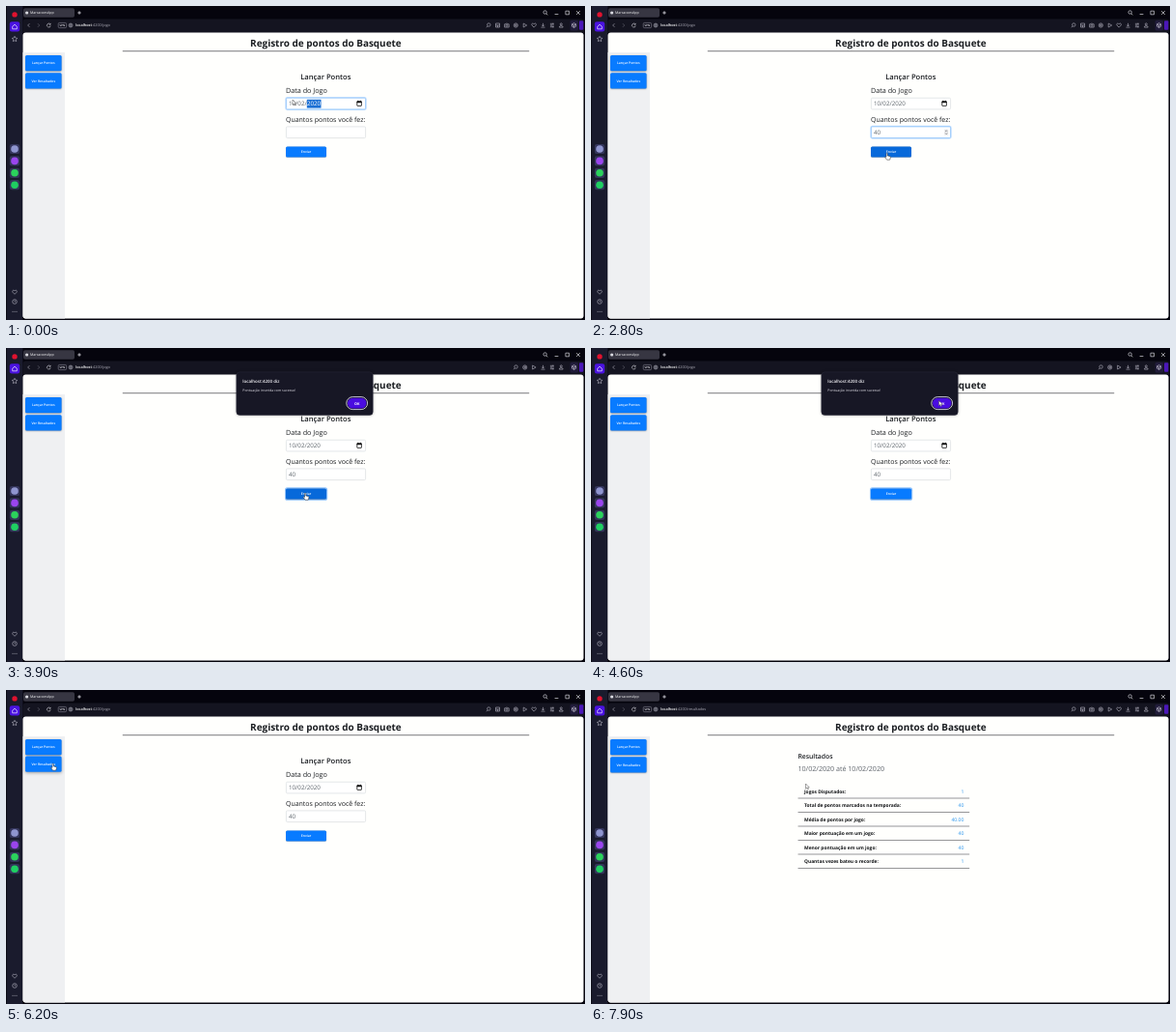
An HTML page with a canvas that plays this animation: 600 px wide and 325 px high, repeating every 8000 ms.

```html
<!DOCTYPE html>
<html lang="pt-BR">
<head>
<meta charset="utf-8">
<title>Registro de pontos</title>
<style>
html, body { margin: 0; width: 100%; height: 100%; overflow: hidden; background: #05040d; }
canvas { display: block; width: 600px; height: 325px; }
</style>
</head>
<body>
<canvas id="stage"></canvas>
<script>
const W = 600, H = 325, LOOP = 8000, STEP = 100;
const FONT = '"Open Sans", "Noto Sans", sans-serif';
const BLUE = '#087bff', HOVER = '#0769da', INK = '#1a1d21', VALUE = '#5d646b';
const canvas = document.getElementById('stage');
const c = canvas.getContext('2d');
const dpr = window.devicePixelRatio || 1;
canvas.width = W * dpr;
canvas.height = H * dpr;

// Moments of the interaction, in ms
const FOCUS = 1100, KEYS = [1900, 2100], SUBMIT = 2900, OPEN = 3000, CLOSE = 4700, NAV = 6500;

// Pointer rests: [leave at, arrive at, x, y]
const MOVES = [
  [0, 0, 297, 97],
  [300, 1000, 313, 129],
  [2200, 2700, 306, 152],
  [2900, 3600, 309.5, 150],
  [3900, 4500, 360.5, 54.5],
  [4900, 5900, 48, 76],
  [6600, 7400, 222.5, 97]
];

const ease = p => p * p * (3 - 2 * p);

function pointerAt(t) {
  let [, , x, y] = MOVES[0];
  for (const [from, to, nx, ny] of MOVES.slice(1)) {
    if (t <= from) break;
    const p = ease(Math.min(1, (t - from) / (to - from)));
    x += (nx - x) * p;
    y += (ny - y) * p;
  }
  return [x, y];
}

function text(s, x, y, size, color, weight = 400, align = 'left') {
  c.font = `${weight} ${size}px ${FONT}`;
  c.textAlign = align;
  c.fillStyle = color;
  c.fillText(s, x, y);
  return c.measureText(s).width;
}

function rect(x, y, w, h, fill) {
  c.fillStyle = fill;
  c.fillRect(x, y, w, h);
}

function box(x, y, w, h, r, fill, stroke, lw = 0.6) {
  c.beginPath();
  c.roundRect(x, y, w, h, r);
  paint(fill, stroke, lw);
}

function disc(x, y, r, fill, stroke, lw = 0.6) {
  c.beginPath();
  c.arc(x, y, r, 0, 7);
  paint(fill, stroke, lw);
}

function paint(fill, stroke, lw) {
  if (fill) { c.fillStyle = fill; c.fill(); }
  if (stroke) { c.strokeStyle = stroke; c.lineWidth = lw; c.stroke(); }
}

function path(d, x, y, stroke, lw = 0.65, fill) {
  c.save();
  c.translate(x, y);
  const p = new Path2D(d);
  if (fill) { c.fillStyle = fill; c.fill(p); }
  if (stroke) { c.strokeStyle = stroke; c.lineWidth = lw; c.stroke(p); }
  c.restore();
}

const ICONS = {
  find: 'M1.3-.5A1.7 1.7 0 1 1-2.1-.5A1.7 1.7 0 1 1 1.3-.5M.8 .8L2.3 2.3',
  edit: 'M1.9-.5A1.7 1.7 0 1 1-1.5-.5A1.7 1.7 0 1 1 1.9-.5M-1 .8L-2.3 2.2',
  split: 'M-2-2H2V2H-2ZM-2 0H2M0 0V2',
  camera: 'M-2.3-1.2H-1L-.5-2H.5L1-1.2H2.3V2H-2.3ZM1 .3A1 1 0 1 1-1 .3A1 1 0 1 1 1 .3',
  shield: 'M2.1 0A2.1 2.1 0 1 1-2.1 0A2.1 2.1 0 1 1 2.1 0M-.7-.8H.8V.8H-.7Z',
  play: 'M-1.5-2L2 0L-1.5 2Z',
  heart: 'M0 2.1L-2.1 0C-3-1.5-1-3 0-1.2C1-3 3-1.5 2.1 0Z',
  down: 'M0-2.2V1M-1.4-.4L0 1L1.4-.4M-2 2.1H2',
  list: 'M-2-1.7H2M-2 0H2M-2 1.7H2M.9-2.3V-1.1M-.9-.6V.6M.9 1.1V2.3',
  user: 'M1-1.2A1 1 0 1 1-1-1.2A1 1 0 1 1 1-1.2M-1.8 2.1V1.2Q0-.4 1.8 1.2V2.1Z',
  cube: 'M0-2.3L2-1.2V1.2L0 2.3L-2 1.2V-1.2ZM-2-1.2L0 0L2-1.2M0 0V2.3',
  house: 'M-2.3-.2L0-2.3L2.3-.2V2.4H-2.3Z',
  star: 'M0-2.7L.9-.9L2.8-.6L1.4.7L1.7 2.6L0 1.7L-1.7 2.6L-1.4.7L-2.8-.6L-.9-.9Z',
  reload: 'M1.6-1A1.9 1.9 0 1 0 1.9.4M1.8-2.2V-.8H.4'
};
const icon = (name, x, y, color = '#b9b8c4', lw = 0.6) => path(ICONS[name], x, y, color, lw);

function chrome(t) {
  rect(0, 0, W, H, '#05040d');
  rect(0.8, 0, 16.6, H, '#1a1b2d');
  box(17.5, 13.5, 581.5, 18, 3, '#141420');

  // Left rail
  disc(9, 8.9, 2.7, '#e0122f');
  box(3.8, 16.3, 10.4, 10.2, 2.2, '#4a12e0');
  icon('house', 9, 21.4, '#eeeaff', 0.7);
  icon('star', 9, 34);
  ['#8f95cf', '#9a45ee', '#2bd25c', '#1fcf62'].forEach((fill, i) => {
    const y = 148 + i * 12.4;
    box(3.8, y - 5.1, 10.4, 10.2, 2.2, '#34355a');
    disc(9, y, 3.8, fill);
  });
  icon('heart', 9, 296.2);
  disc(9, 306, 2.3, null, '#b9b8c4');
  path('M0-1.4V0H1', 9, 306, '#b9b8c4', 0.5);
  for (let i = -1; i < 2; i++) disc(9 + i * 2, 316.3, 0.5, '#b9b8c4');

  // Tab strip
  box(18, 2.2, 53, 9.6, 1.8, '#373642');
  disc(21.6, 7, 1.6, '#d9d9e0');
  text('MarcacoesApp', 25, 8.3, 3.6, '#fff');
  path('M-1.7 0H1.7M0-1.7V1.7', 76, 7, '#e6e6ec', 0.8);
  icon('find', 559, 7, '#d5d4dc', 0.7);
  path('M-1.9 1.5H1.9', 570.5, 7, '#d5d4dc', 0.7);
  path('M-1.8-1.8H1.8V1.8H-1.8Z', 581.7, 7, '#d5d4dc', 0.7);
  path('M-1.9-1.9L1.9 1.9M1.9-1.9L-1.9 1.9', 593, 7, '#d5d4dc', 0.7);

  // Address bar
  path('M1-1.8L-.8 0L1 1.8', 23.4, 20, '#aaa9b6');
  path('M-1-1.8L.8 0L-1 1.8', 33.9, 20, '#666573');
  icon('reload', 44.3, 20, '#d5d4dc');
  box(54.2, 17.4, 8.4, 5.2, 1.2, null, '#9c9ba8', 0.5);
  text('VPN', 58.4, 21.1, 2.9, '#e4e3ea', 600, 'center');
  disc(67, 20, 2, null, '#b9b8c4', 0.5);
  path('M-2 0H2M0-2Q-1.6 0 0 2M0-2Q1.6 0 0 2', 67, 20, '#b9b8c4', 0.4);
  const w = text('localhost', 72.2, 21.3, 3.85, '#fff', 600);
  text(':4200/' + (t < NAV ? 'jogo' : 'resultados'), 72.2 + w, 21.3, 3.85, '#b1b0bb');

  const modal = t >= OPEN && t < CLOSE;
  const tools = modal
    ? ['edit', 'shield', 'play', 'down', 'list', 'user']
    : ['edit', 'split', 'camera', 'shield', 'play', 'heart', 'down', 'list', 'user'];
  tools.forEach((name, i) => icon(name, 575.3 - (tools.length - 1 - i) * 9.4, 20));
  box(584.6, 14.8, 8.4, 10.6, 1.5, '#211c3a');
  icon('cube', 588.6, 20, '#dedbea');
  box(594, 15.3, 4.3, 9.4, 1, '#4b17b8');
}

function button(label, x, y, w, h, fill, shadow) {
  c.save();
  c.shadowColor = 'rgba(0,0,0,.36)';
  c.shadowBlur = shadow * 1.5 * dpr;
  c.shadowOffsetY = shadow * 0.5 * dpr;
  box(x, y, w, h, 1.5, fill);
  c.restore();
  text(label, x + w / 2, y + h / 2 + 1.25, 3.45, '#fff', 600, 'center');
}

// Side buttons rise a little under the pointer
function sideButton(label, y, hot) {
  button(label, 20, hot ? y - 0.8 : y, 37.6, 16.3, BLUE, hot ? 2.2 : 1.2);
}

function field(y, focus) {
  if (focus) box(290, y - 0.4, 83, 12.5, 1.4, null, '#c9e2ff', 1.5);
  box(290.4, y, 82.2, 11.7, 1.2, '#fff', focus ? '#74b5f8' : '#d6dade', 0.65);
}

function form(t, hot) {
  text('Lançar Pontos', 331.3, 75.7, 7.6, INK, 600, 'center');
  text('Data do Jogo', 290, 90.1, 7.2, INK);
  text('Quantos pontos você fez:', 290, 119.7, 6.98, INK);

  field(95.2, t < FOCUS);
  if (t < FOCUS) {
    text('10/02/', 293, 103.4, 6.2, VALUE);
    rect(311.8, 96.8, 14.7, 8.8, '#1a6fd4');
    text('2020', 311.9, 103.4, 6.2, '#fff');
  } else {
    text('10/02/2020', 293, 103.4, 6.2, VALUE);
  }
  box(363.8, 98.9, 4.6, 4.5, 0.4, null, '#111', 0.8);
  rect(363.6, 98.5, 5, 1.7, '#111');
  rect(364.4, 97.8, 0.8, 1, '#111');
  rect(367, 97.8, 0.8, 1, '#111');

  const typing = t >= FOCUS && t < SUBMIT;
  field(124.9, typing);
  text('40'.slice(0, KEYS.filter(k => t >= k).length), 293, 133.2, 6.2, VALUE);
  if (typing) {
    rect(366.2, 127.6, 4, 6.2, '#e9e9ea');
    path('M-1 -.9L0-1.9L1-.9M-1 .9L0 1.9L1 .9', 368.2, 130.7, '#5b5b5f', 0.65);
  }

  const pressed = t >= SUBMIT && t < CLOSE;
  if (pressed) box(289.6, 145, 43, 12.2, 1.9, null, '#8fc4ff', 1.3);
  button('Enviar', 290, 145.6, 42, 11, hot ? HOVER : BLUE, 0.5);
}

function results() {
  text('Resultados', 214.4, 71, 6.8, INK, 600);
  text('10/02/2020 até 10/02/2020', 214.4, 83.5, 7.12, '#5b6168');
  const rows = [
    ['Jogos Disputados:', '1'],
    ['Total de pontos marcados na temporada:', '40'],
    ['Média de pontos por jogo:', '40.00'],
    ['Maior pontuação em um jogo:', '40'],
    ['Menor pontuação em um jogo:', '40'],
    ['Quantas vezes bateu o recorde:', '1']
  ];
  rows.forEach(([label, value], i) => {
    const y = 106.5 + i * 14.5;
    text(label, 221, y, 4.92, '#101215', 700);
    text(value, 386.4, y, 5.1, '#2491ec', 400, 'right');
    rect(214.5, y + 5.1, 177.7, 0.8, '#7c7c7f');
  });
}

function page(t, x, y) {
  box(17.5, 27.5, 581, 296, 3, '#fffffd');
  box(17.5, 48, 43.5, 275.5, [0, 0, 0, 3], '#eff0f2');
  text('Registro de pontos do Basquete', 331.4, 42.4, 9.95, INK, 700, 'center');
  rect(120.8, 46, 421.4, 1.3, '#97979a');
  const over = (bx, by, w, h) => x + 1 > bx && x < bx + w && y > by && y < by + h;
  const first = over(20, 51, 38, 16), second = over(20, 69, 38, 16);
  const send = t < NAV && over(290, 145.5, 42, 11);
  sideButton('Lançar Pontos', 51, first);
  sideButton('Ver Resultados', 69.2, second);
  if (t < NAV) form(t, send);
  else results();
  const inField = t < NAV && over(290, 124.5, 82, 12.5);
  return first || second || send ? 'hand' : inField ? 'beam' : 'arrow';
}

function dialog(t) {
  if (t < OPEN || t > CLOSE + STEP) return;
  if (t > CLOSE) {
    box(239, 27.5, 142, 35, 3, 'rgba(20,20,40,.03)');
    return;
  }
  c.save();
  c.globalAlpha = t === OPEN ? 0.6 : t === CLOSE ? 0.4 : 1;
  c.shadowColor = 'rgba(0,0,0,.4)';
  c.shadowBlur = 3 * dpr;
  box(238.8, 24.8, 141.4, 44.6, 3.5, '#171725');
  c.shadowColor = 'transparent';
  box(238.8, 24.8, 141.4, 44.6, 3.5, null, '#2b2a3b', 0.5);
  text('localhost:4200 diz', 245.3, 36, 4.45, '#f6f5fa', 600);
  text('Pontuação inserida com sucesso!', 245.3, 45.1, 3.56, '#e6e5ec');
  box(352.8, 50.6, 21.8, 13, 6.5, null, '#f1eeff', 0.8);
  box(353.9, 51.7, 19.6, 10.8, 5.4, '#4a0de0');
  text('OK', 363.7, 58.5, 3.7, '#fff', 700, 'center');
  c.restore();
}

function pointer(kind, x, y) {
  if (kind === 'beam') {
    path('M-1.2-2.8H1.2M-1.2 2.8H1.2M0-2.8V2.8', x, y, '#222', 0.7);
  } else if (kind === 'hand') {
    path('M0 .6Q.7-.4 1.3.6V3L3.9 3.6Q4.6 4 4.3 5.2L3.7 7.2H.6L-1.4 4.6Q-1.2 3.6 0 4.4Z',
      x, y, '#222', 0.5, '#fff');
  } else {
    path('M0 0V5.2L1.2 4.1L2 5.9L2.9 5.5L2.1 3.8H3.7Z', x, y, '#444', 0.5, '#fff');
  }
}

function draw(t) {
  c.setTransform(dpr, 0, 0, dpr, 0, 0);
  c.textRendering = 'geometricPrecision';
  const [x, y] = pointerAt(t);
  chrome(t);
  const kind = page(t, x, y);
  dialog(t);
  pointer(kind, x, y);
}

const start = performance.now();
function tick() {
  const t = (performance.now() - start) % LOOP;
  draw(Math.floor(t / STEP) * STEP);
  requestAnimationFrame(tick);
}
tick();
</script>
</body>
</html>
```
